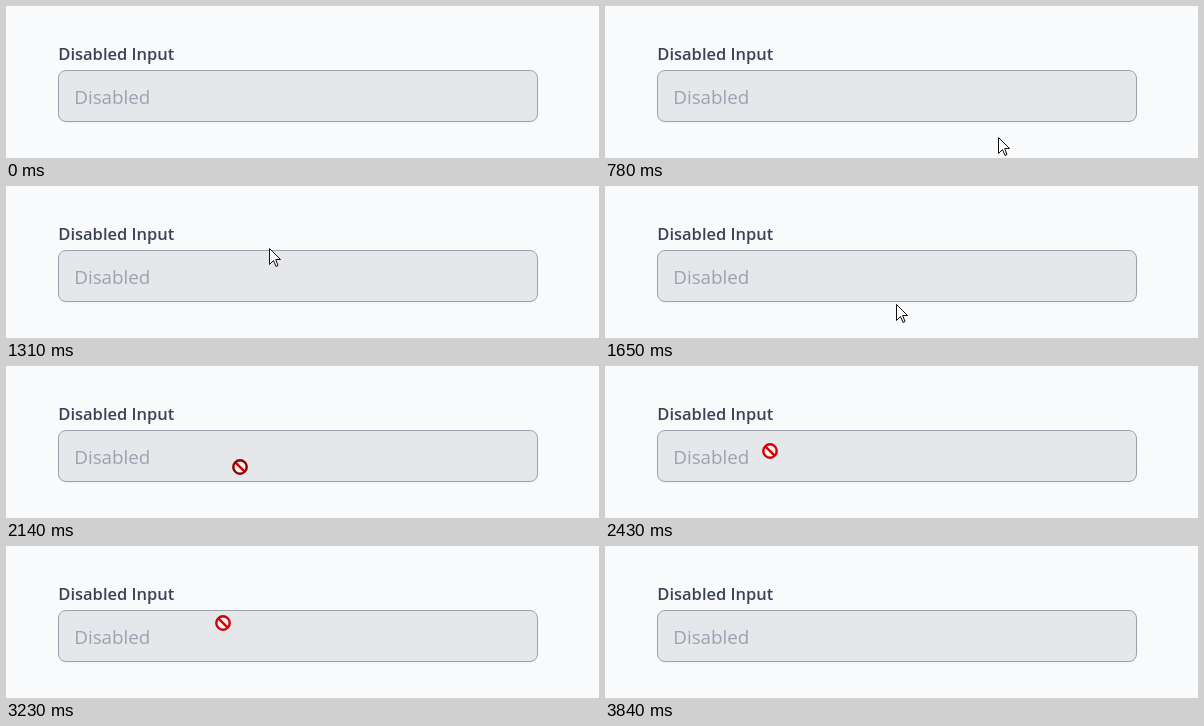
Animation of 593x152 px, one loop 4.43 s. Source, as an HTML page with a canvas:

```html
<!DOCTYPE html>
<html lang="en">
<head>
<meta charset="utf-8">
<title>Disabled input</title>
<style>
  html, body { margin: 0; width: 100%; height: 100%; overflow: hidden; background: #f9fafb; }
  canvas { display: block; }
</style>
</head>
<body>
<canvas id="stage" width="593" height="152"></canvas>
<script>
const ctx = document.getElementById('stage').getContext('2d');
const LOOP = 4430;
const STEP = 67;
const field = { x: 52, y: 64, w: 480, h: 52, r: 7.5 };

// Turning points of the pointer: time, x, y
const turns = [
  [780, 393, 131], [1050, 360, 74], [1280, 263, 62], [1440, 369, 49],
  [1650, 291, 118], [1720, 300, 133], [1790, 343, 97], [2140, 234, 101],
  [2430, 165, 85], [2830, 215, 35], [3230, 217, 77], [3360, 217, 77],
  [3430, 466, 116], [3840, 520, 150]
];

const easeInOut = u => u < 0.5 ? 4 * u ** 3 : 1 - 4 * (1 - u) ** 3;
const mix = (a, b, u) => a + (b - a) * u;
const ramp = (t, from, to) => Math.min(1, Math.max(0, (t - from) / (to - from)));

// The pointer eases between turns in steps, like a screen recording.
function pointerAt(t) {
  const next = turns.findIndex(turn => turn[0] > t);
  if (next < 1) return null;
  const [t0, x0, y0] = turns[next - 1];
  const [t1, x1, y1] = turns[next];
  const steps = Math.max(1, Math.round((t1 - t0) / STEP));
  const u = easeInOut(Math.floor(ramp(t, t0, t1) * steps) / steps);
  return { x: Math.round(mix(x0, x1, u)), y: Math.round(mix(y0, y1, u)) };
}

function isOverField({ x, y }) {
  return x >= field.x && x <= field.x + field.w &&
    y >= field.y && y <= field.y + field.h;
}

function text(str, x, y, font, color) {
  ctx.font = `${font} "Open Sans", "Noto Sans", sans-serif`;
  ctx.fillStyle = color;
  ctx.fillText(str, x, y);
}

function drawForm() {
  ctx.fillStyle = '#f9fafb';
  ctx.fillRect(0, 0, 593, 152);
  text('Disabled Input', 52.3, 54, '600 16.5px', '#3b4256');

  ctx.beginPath();
  ctx.roundRect(field.x + 0.5, field.y + 0.5, field.w - 1, field.h - 1, field.r);
  ctx.save();
  ctx.shadowColor = 'rgba(0, 0, 0, 0.05)';
  ctx.shadowOffsetY = 1;
  ctx.shadowBlur = 2;
  ctx.fillStyle = '#e5e7eb';
  ctx.fill();
  ctx.restore();
  ctx.strokeStyle = '#9ca3af';
  ctx.lineWidth = 1;
  ctx.stroke();
  text('Disabled', 68.2, 98, '400 18.8px', '#9ca3af');
}

function drawArrow({ x, y }) {
  const outline = [[0, 0], [0, 16], [4, 12], [6.5, 18], [8.5, 17], [6.2, 11], [11, 11]];
  ctx.beginPath();
  outline.forEach(([dx, dy]) => ctx.lineTo(x + 0.5 + dx, y + 0.5 + dy));
  ctx.closePath();
  ctx.fillStyle = '#fff';
  ctx.fill();
  ctx.strokeStyle = '#111';
  ctx.lineWidth = 1;
  ctx.stroke();
}

function drawForbidden({ x, y }, t) {
  const red = brightness => `rgb(${mix(118, 212, brightness)}, 0, 0)`;
  const ring = new Path2D();
  ring.arc(x, y, 6.7, 0, Math.PI * 2);
  ctx.fillStyle = '#f8f4f4';
  ctx.fill(ring);
  ctx.lineWidth = 2.4;
  ctx.strokeStyle = red(ramp(t, 1650, 2140));
  ctx.beginPath();
  ctx.moveTo(x - 4.7, y - 4.7);
  ctx.lineTo(x + 4.7, y + 4.7);
  ctx.stroke();
  ctx.strokeStyle = red(ramp(t, 2050, 2430));
  ctx.stroke(ring);
}

function drawPointer(t) {
  const pointer = pointerAt(t);
  if (!pointer) return;
  if (isOverField(pointer)) drawForbidden(pointer, t);
  else drawArrow(pointer);
}

const start = performance.now();
function frame() {
  drawForm();
  drawPointer((performance.now() - start) % LOOP);
  requestAnimationFrame(frame);
}
frame();
</script>
</body>
</html>
```
